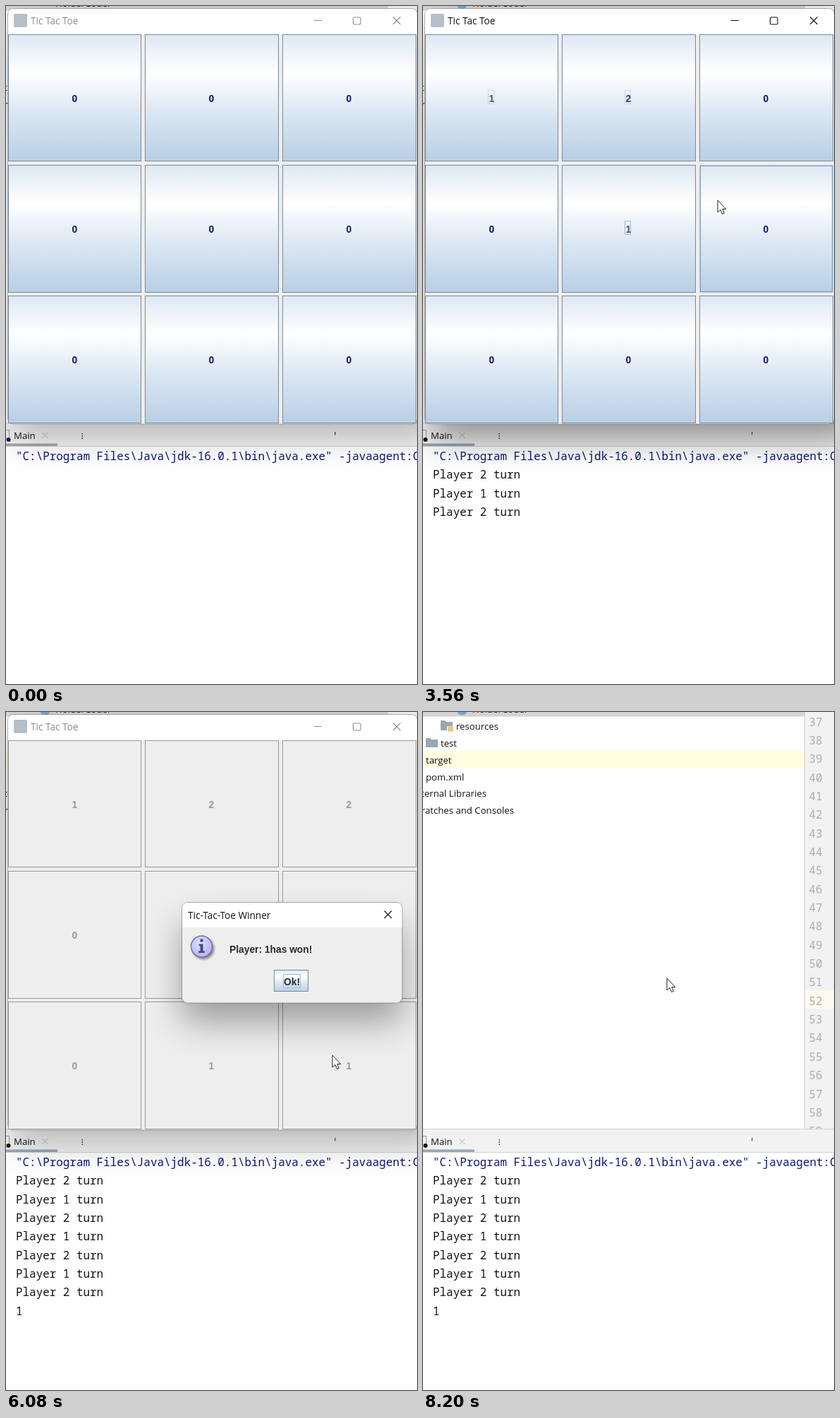
Recreate the animation shown at these times as an HTML page. Size 583x960 px, loop 8270 ms.

```html
<!DOCTYPE html>
<html lang="en">
<head>
<meta charset="utf-8">
<title>Tic Tac Toe</title>
<style>
  html, body { margin: 0; width: 100%; height: 100%; overflow: hidden; background: #fefefe; }
  svg { display: block; width: 583px; height: 960px; }
  text { white-space: pre; }
  .ui { font: 13.2px "Open Sans", "Noto Sans", sans-serif; fill: #111; }
  .mono { font: 15.92px "Noto Sans Mono", "DejaVu Sans Mono", monospace; fill: #111; }
  .num { fill: #adadad; }
  .cmd { fill: #0a1478; }
  .title { font-size: 13.6px; }
  .bold { font: bold 13.8px "Liberation Sans", Arial, sans-serif; }
  .mid { text-anchor: middle; }
  .end { text-anchor: end; }
  .line { fill: none; stroke: #111; stroke-width: 1.1; }

  .face { fill: url(#metal); stroke: #7a8a99; }
  .rim { fill: none; stroke: #7899bd; visibility: hidden; }
  .focus { fill: none; stroke: #a3b8cc; visibility: hidden; }
  .focus.on { visibility: visible; }
  .focus.ghost { visibility: visible; opacity: .45; }
  .cell text { fill: #11116e; }
  .cell .v1 { fill: #4d5560; }
  .cell .v2 { fill: #333863; }
  .hover .face { stroke: #b8cfe5; }
  .hover .rim { visibility: visible; }
  .pressed .face { fill: #b8cfe5; }

  .big { display: none; }
  .active .big { display: inline; }
  .active .small { display: none; }
  .idle .dot, .idle .mark { fill: #11116e; }
  .idle .ball { display: none; }
  .idle .tabline { fill: #a6a6a6; }
  #win.dim .title { fill: #8c8c8c; }
  #win.dim .line { stroke: #8c8c8c; }
  #win.over .face { fill: #eee; stroke: #999; }
  #win.over .cell text { fill: #999; }
  #win.over .focus, #win.over .rim { visibility: hidden; }
</style>
</head>
<body>
<svg id="stage" viewBox="0 0 583 960">
  <defs>
    <linearGradient id="metal" x2="0" y2="1">
      <stop offset="0" stop-color="#dde8f3"/>
      <stop offset=".3" stop-color="#fff"/>
      <stop offset=".6" stop-color="#dde8f3"/>
      <stop offset="1" stop-color="#b8cfe5"/>
    </linearGradient>
    <radialGradient id="orb" cx=".4" cy=".35">
      <stop offset="0" stop-color="#e2e2ff"/>
      <stop offset="1" stop-color="#bcbcf4"/>
    </radialGradient>
    <filter id="soft" x="-40%" y="-80%" width="180%" height="260%"><feGaussianBlur stdDeviation="24"/></filter>
    <filter id="tiny" x="-30%" y="-30%" width="160%" height="160%"><feGaussianBlur stdDeviation="1.5"/></filter>
    <clipPath id="editor"><rect width="583" height="590"/></clipPath>
  </defs>

  <!-- project tree and gutter -->
  <rect width="583" height="960" fill="#fefefe"/>
  <g clip-path="url(#editor)">
    <rect width="541" height="6.5" fill="#d4d4d4"/>
    <circle class="ball" cx="55.500" cy="-3" r="7.500" fill="#6fa8d8"/>
    <text class="ui" x="70" y="1">HolderCoder</text>
    <rect id="target" y="55" width="541" height="24" fill="#fffee0"/>
    <path d="M25 12h6l2 2h9v12h-17z" fill="#9aa7b0"/>
    <path d="M34 20h9v8h-9z" fill="#fefefe"/>
    <path d="M35 21.500h8M35 24h8M35 26.500h8" stroke="#e0a04a" stroke-width="1.300"/>
    <path d="M4 37h6l2 2h9v11h-17z" fill="#9aa7b0"/>
    <g class="ui">
      <text x="47" y="25">resources</text>
      <text x="25" y="49">test</text>
      <text x="4" y="73">target</text>
      <text x="4" y="97">pom.xml</text>
      <text class="end" x="90" y="120">External Libraries</text>
      <text class="end" x="129" y="144">Scratches and Consoles</text>
    </g>
    <rect x="541" width="42" height="590" fill="#f2f2f2"/>
    <rect x="542" y="394" width="41" height="26.500" fill="#fcfaed"/>
    <path d="M541.500 0V590" stroke="#d2d2d2"/>
    <g id="gutter"></g>
  </g>

  <!-- run panel -->
  <rect y="590" width="583" height="33" fill="#f2f2f2"/>
  <path d="M0 590.500H583M0 623.500H583" stroke="#d1d1d1"/>
  <rect class="tabline" y="619.500" width="73" height="3.500" fill="#98a6b4"/>
  <path d="M0 600.500H4.500V612" fill="none" stroke="#8d99a3"/>
  <circle class="dot" cx="3.500" cy="614" r="3" fill="#111"/>
  <text class="ui" x="11" y="613">Main</text>
  <path d="M51.500 604l8 8m0-8l-8 8" stroke="#b4b4b4"/>
  <path class="mark" d="M107.500 605h1.500v1.500h-1.500zm0 3.200h1.500v1.500h-1.500zm0 3.200h1.500v1.500h-1.500zM466.300 603h1.200l-.3 4.500h-.9z" fill="#333"/>
  <text class="mono cmd" x="14" y="643">"C:\Program Files\Java\jdk-16.0.1\bin\java.exe" -javaagent:C</text>
  <g id="log"></g>

  <!-- game window -->
  <g id="win">
    <rect class="small" x="10" y="26" width="600" height="584" opacity=".25" filter="url(#soft)"/>
    <rect class="big" x="12" y="30" width="600" height="582" opacity=".42" filter="url(#soft)"/>
    <rect x="2.500" y="3.500" width="581" height="588.500" rx="8" fill="#eee" stroke="#000" stroke-opacity=".28"/>
    <path d="M3 40V12a8 8 0 0 1 8-8H575a8 8 0 0 1 8 8V40z" fill="#fff"/>
    <rect x="11" y="11" width="19" height="19" rx="2" fill="#b4bfca"/>
    <text class="ui title" x="35" y="26">Tic Tac Toe</text>
    <path class="line" d="M436.500 20.500h11.500M549 15.500l10.500 10.500m0-10.500l-10.500 10.500"/>
    <rect class="line" x="492.500" y="16" width="10.500" height="10" rx="1.500"/>
    <g id="board"></g>
  </g>

  <!-- winner dialog -->
  <g id="dialog">
    <rect x="249" y="300" width="313" height="140" rx="8" opacity=".33" filter="url(#soft)"/>
    <rect x="249.500" y="269.500" width="312.500" height="142.500" rx="8" fill="#eee" stroke="#000" stroke-opacity=".3"/>
    <path d="M250 305V277a7 7 0 0 1 7-7H554.500a7 7 0 0 1 7 7V305z" fill="#fff"/>
    <text class="ui title" x="258" y="292.500">Tic-Tac-Toe Winner</text>
    <path class="line" d="M536.500 281.500l10.500 10.500m0-10.500l-10.500 10.500"/>
    <circle cx="280" cy="335" r="15.500" opacity=".4" filter="url(#tiny)"/>
    <circle cx="277.500" cy="332" r="15" fill="url(#orb)" stroke="#6d74a8" stroke-width="1.500"/>
    <path d="M275.500 321.500h4v4h-4zM273.500 328.500h6v10h2.500v2.500h-9v-2.500h2.500v-7.500h-2z" fill="#444c7c"/>
    <text class="bold" x="317" y="341" fill="#2b2b2b">Player: 1has won!</text>
    <rect id="ok" class="face" x="380.500" y="365.500" width="48" height="30"/>
    <rect x="393.500" y="371.500" width="24" height="19" fill="none" stroke="#a3b8cc"/>
    <text class="bold mid" x="405.500" y="387" fill="#2b2b2b">Ok!</text>
  </g>

  <g id="pointer">
    <circle id="press" r="14.500" fill="#fffb4a" opacity=".92"/>
    <path d="M0 0V17L4 13.500L6.500 19.500L9.300 18.300L6.800 12.500H11.800Z" fill="#fff" stroke="#222"/>
  </g>
</svg>

<script>
const LOOP = 8270, STEP = 70, LINE = 26.35;
const $ = id => document.getElementById(id);

// start and size of each column and row
const cols = [[3.5, 188], [197.5, 189], [392.5, 189]];
const rows = [[40.5, 179], [225.5, 180], [410.5, 180]];

// press, release, cell, player, time of the console line
const clicks = [
  [1400, 1540, 0, 1, 1540],
  [1950, 2080, 1, 2, 2220],
  [3150, 3290, 4, 1, 3290],
  [3960, 4100, 5, 2, 4100],
  [4710, 4780, 7, 1, 4780],
  [5330, 5460, 2, 2, 5460],
  [5740, 5880, 8, 1, 5880]
];
const ghosts = [0, 1, 5];
const ACTIVE = 1000, OVER = 5880, DIALOG = 5950;
const DRAG = [6820, 7370], OK = [7720, 7860], CLOSE = [7930, 8200];

// pointer: time, x, y
const path = [
  [260, 468, 938], [330, 231, 848],
  [860, 150, 600], [1200, 130, 150], [1540, 130, 150], [1820, 268, 133],
  [2480, 268, 133], [2950, 300, 290], [3290, 300, 290], [3560, 418, 275],
  [3760, 424, 284], [4100, 424, 284], [4510, 330, 470], [4780, 330, 470],
  [4850, 442, 310], [5130, 450, 140], [5600, 450, 140], [5670, 463, 490],
  [5740, 463, 486], [6610, 463, 486], [6820, 439, 290], [7370, 397, 290],
  [7440, 397, 290], [7720, 346, 377]
];

const inside = (t, [a, b]) => t >= a && t < b;
const ramp = (t, a, b) => Math.min(1, Math.max(0, (t - a) / (b - a)));

function add(parent, tag, attrs, text) {
  const el = document.createElementNS("http://www.w3.org/2000/svg", tag);
  for (const k in attrs) el.setAttribute(k, attrs[k]);
  if (text !== undefined) el.textContent = text;
  parent.appendChild(el);
  return el;
}

for (let i = 0; i < 23; i++)
  add($("gutter"), "text", { class: "mono num", x: 547.5, y: 19.5 + i * LINE }, 37 + i);

const addLine = (i, text) => add($("log"), "text", { class: "mono", x: 14, y: 643 + i * LINE }, text);
const lines = clicks.map(([, , , player, at], i) => ({ at, el: addLine(i + 1, `Player ${3 - player} turn`) }));
lines.push({ at: DIALOG, el: addLine(8, "1") });

const cells = Array.from({ length: 9 }, (_, i) => {
  const [x, w] = cols[i % 3], [y, h] = rows[Math.floor(i / 3)];
  const cx = Math.ceil(x + w / 2), cy = y + 90;
  const g = add($("board"), "g", { class: "cell" });
  add(g, "rect", { class: "face", x, y, width: w, height: h });
  add(g, "rect", { class: "rim", x: x + 1, y: y + 1, width: w - 2, height: h - 2 });
  const focus = add(g, "rect", { class: "focus", x: cx - 5.5, y: cy - 11, width: 8, height: 19 });
  const label = add(g, "text", { class: "bold mid", x: cx - .6, y: cy + 5.5 }, "0");
  return { x, y, w, h, g, focus, label, click: clicks.find(c => c[2] === i) };
});

function pointerAt(t) {
  let i = path.length - 1;
  while (i > 0 && path[i][0] > t) i--;
  const [t0, x0, y0] = path[i], [t1, x1, y1] = path[i + 1] || [LOOP, x0, y0];
  const u = Math.floor((t - t0) / STEP) * STEP / (t1 - t0);
  return { x: x0 + (x1 - x0) * u, y: y0 + (y1 - y0) * u };
}

const show = (el, on) => { el.style.display = on ? "" : "none"; };

function render(t) {
  const p = pointerAt(t);
  const active = t >= ACTIVE, over = t >= OVER;
  const last = clicks.filter(c => t >= c[0]).pop();

  show($("pointer"), inside(t, [260, 400]) || t >= 860);
  $("pointer").setAttribute("transform", `translate(${p.x} ${p.y})`);
  show($("press"), clicks.some(c => inside(t, c)) || inside(t, DRAG) || inside(t, OK));

  $("stage").setAttribute("class", active ? "" : "idle");
  $("win").setAttribute("class", (active && !over ? "active" : "dim") + (over ? " over" : ""));
  show($("target"), over);
  lines.forEach(l => show(l.el, t >= l.at));

  cells.forEach((c, i) => {
    const done = c.click && t >= c.click[1];
    const value = done ? c.click[3] : 0;
    const hover = active && !over && p.x > c.x && p.x < c.x + c.w && p.y > c.y && p.y < c.y + c.h;
    const pressed = c.click && inside(t, c.click);
    c.g.setAttribute("class", "cell" + (hover ? " hover" : "") + (pressed ? " pressed" : ""));
    c.label.textContent = value;
    c.label.setAttribute("class", "bold mid v" + value);
    const mark = last && last[2] === i ? " on" : done && ghosts.includes(i) ? " ghost" : "";
    c.focus.setAttribute("class", "focus" + mark);
  });

  const left = 1 - ramp(t, ...CLOSE), size = .94 + .06 * left;
  const zoom = (cx, cy) => `translate(${cx} ${cy}) scale(${size}) translate(${-cx} ${-cy})`;
  $("win").setAttribute("transform", zoom(292, 297));
  $("win").style.opacity = left;

  const dx = t < DRAG[0] ? 0 : pointerAt(Math.min(t, DRAG[1])).x - 439;
  $("dialog").setAttribute("transform", `translate(${dx} 0) ` + zoom(405, 340));
  $("dialog").style.opacity = ramp(t, DIALOG - STEP, DIALOG + 130) * left * left;
  show($("dialog"), t >= DIALOG);
  $("ok").style.fill = inside(t, OK) ? "#b8cfe5" : "";
}

const start = performance.now();
function tick() {
  render((performance.now() - start) % LOOP);
  requestAnimationFrame(tick);
}
tick();
</script>
</body>
</html>
```
